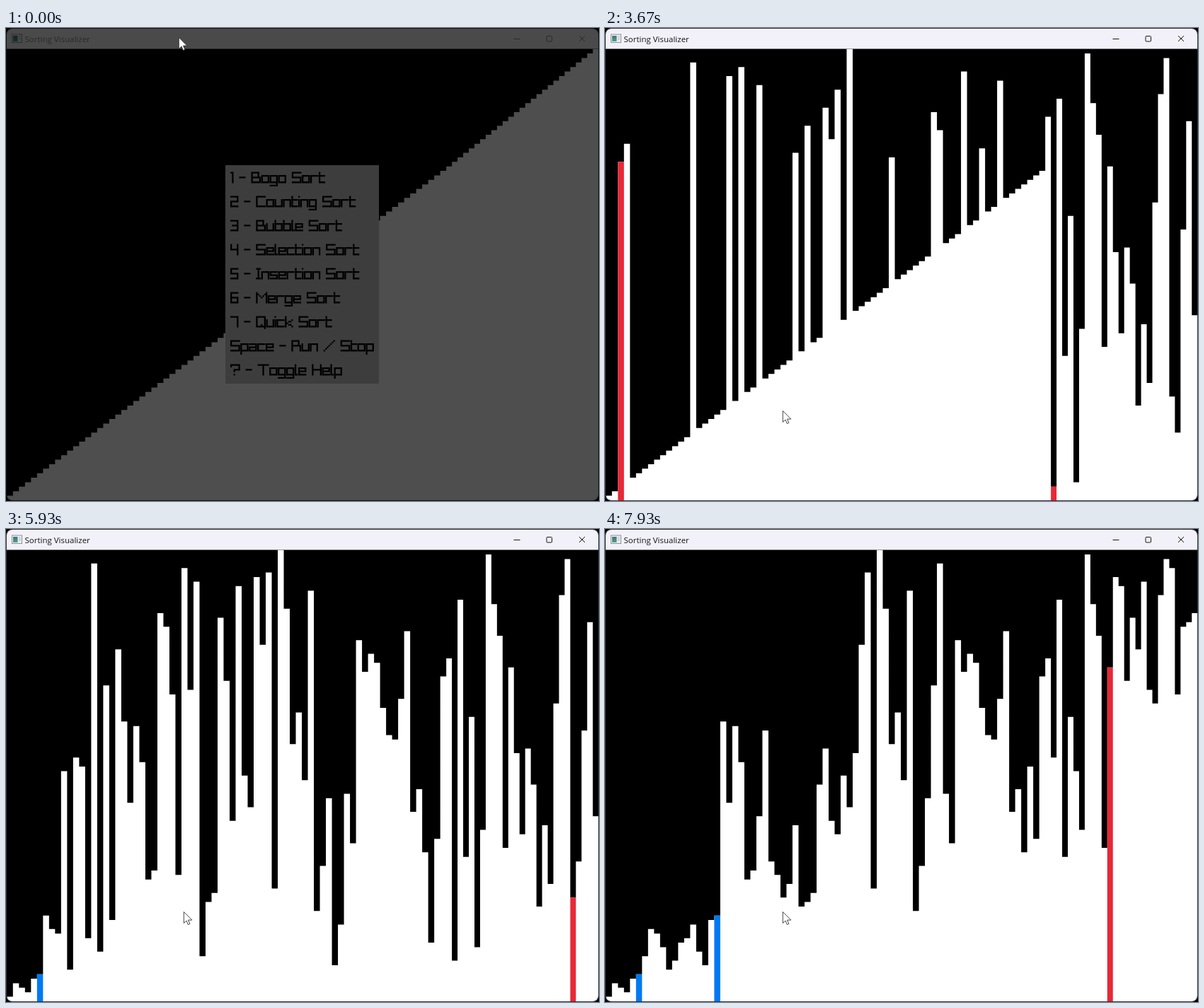
Write an HTML page with a canvas that moves like this. It is 838x669 px and loops after 8000 ms.

```html
<!DOCTYPE html>
<html lang="en">
<head>
<meta charset="utf-8">
<title>Sorting Visualizer</title>
<style>
  html, body { margin: 0; width: 100%; height: 100%; overflow: hidden; background: #060608; }
  #stage { position: absolute; left: 0; top: 0; width: 838px; height: 669px; overflow: hidden; }
  #edge { position: absolute; inset: 0; border-radius: 9px; background: #34343a; }
  #window { position: absolute; left: 1px; top: 1px; width: 836px; height: 667px; border-radius: 8px; overflow: hidden; background: #000; }
  #bars { position: absolute; left: -1px; top: -1px; }
  svg { position: absolute; left: 0; top: 0; }
  #dim { position: absolute; inset: 0; background: #000; }
  #caption { color: #161616; }
  #caption.inactive { color: #858585; }
</style>
</head>
<body>
<div id="stage">
  <div id="edge"></div>
  <div id="window"><canvas id="bars" width="838" height="669"></canvas></div>
  <svg width="838" height="669">
    <defs>
      <linearGradient id="pane" x2="0" y2="1">
        <stop offset="0" stop-color="#3f6f8f"/><stop offset="1" stop-color="#4fa37c"/>
      </linearGradient>
    </defs>
    <path id="bar" d="M1 29.5V9a8 8 0 0 1 8-8H829a8 8 0 0 1 8 8V29.5Z"/>
    <rect x="8.5" y="9" width="14" height="11.5" fill="#eef0f0" stroke="#8d9494"/>
    <rect x="10" y="11" width="6.5" height="8" fill="url(#pane)"/>
    <path d="M18 12h3M18 14h3M18 16h3" stroke="#b4bcbc"/>
    <g id="caption" fill="none" stroke="currentColor">
      <text x="26.5" y="19.6" font-size="11.5" font-family="'Open Sans','Noto Sans',sans-serif" fill="currentColor" stroke="none">Sorting Visualizer</text>
      <path d="M717.5 15.5h9M810 11l8 8M818 11l-8 8"/>
      <rect x="764" y="11.5" width="7.5" height="7.5" rx="1"/>
    </g>
    <g id="menu" role="img">
      <rect x="310" y="194" width="217" height="309" fill="#c8c8c8"/>
      <path id="lines"/>
    </g>
  </svg>
  <div id="dim"></div>
  <svg width="838" height="669">
    <path id="cursor" d="M0 0V16L3.7 12.5 6 18 8.5 17 6.2 11.6H11.5Z" fill="#fff" stroke="#333" stroke-width=".9"/>
  </svg>
</div>
<script>
const $ = id => document.getElementById(id);
const ctx = $('bars').getContext('2d');
const COUNT = 100, FPS = 15, LOOP = 8000;
const RED = '#e62937', BLUE = '#0079f1';

// Pixel font: each stroke is x1 y1 x2 y2, baseline on row 6
const GLYPHS = {
  1: '0010 1016', 2: '0040 4043 0343 0306 0646', 3: '0040 4046 1343 0646',
  4: '0003 0343 4046', 5: '0040 0003 0343 4346 0646', 6: '0040 0006 0343 4346 0646',
  7: '0040 4046', '?': '0050 0001 5053 2353 2324 2626', '-': '0333', '/': '0660',
  B: '0006 0040 4043 0353 5356 0656', C: '0050 0006 0656', H: '0006 5056 0353',
  I: '0020 1016 0626', M: '0006 6066 0033 6033', Q: '0050 0006 5056 0656 3557',
  R: '0006 0040 4043 0353 5356', S: '0050 0003 0353 5356 0656', T: '0060 3036',
  a: '0242 4246 0444 0406 0646', b: '0006 0242 4246 0646', c: '0242 0206 0646',
  e: '0242 0206 4244 0444 0646', g: '0242 0206 4248 0646 0848', i: '0000 0206',
  k: '0006 0442 1446', l: '0006 0616', n: '0242 0206 4246', o: '0242 0206 4246 0646',
  p: '0242 0208 4246 0646', r: '0242 0206', s: '0242 0204 0444 4446 0646',
  t: '0006 0232 0636', u: '0206 4246 0646'
};
const MENU = ['1 - Bogo Sort', '2 - Counting Sort', '3 - Bubble Sort', '4 - Selection Sort',
  '5 - Insertion Sort', '6 - Merge Sort', '7 - Quick Sort', 'Space - Run / Stop', '? - Toggle Help'];

function textPath(text, x, y, unit, gap) {
  let path = '';
  const box = (cx, cy, w, h) =>
    path += `M${x + cx * unit} ${y + cy * unit}h${w * unit}v${h * unit}h${-w * unit}z`;
  for (const ch of text) {
    let width = ch === ' ' ? 3 : 1;
    for (const stroke of GLYPHS[ch]?.split(' ') ?? []) {
      const [x1, y1, x2, y2] = [...stroke].map(Number);
      const dx = x2 - x1, dy = y2 - y1;
      width = Math.max(width, x1 + 1, x2 + 1);
      if (!dx || !dy) { box(x1, y1, dx + 1, dy + 1); continue; }
      const n = Math.max(Math.abs(dx), Math.abs(dy));
      for (let k = 0; k <= n; k++) box(x1 + Math.round(dx * k / n), y1 + Math.round(dy * k / n), 1, 1);
    }
    x += width * unit + gap;
  }
  return path;
}
$('lines').setAttribute('d', MENU.map((line, row) => textPath(line, 317, 203.4 + row * 34, 2.287, 0.5)).join(''));
$('menu').setAttribute('aria-label', MENU.join(', '));

// Order of the bars once the shuffle is done
const SHUFFLED = [
  6, 12, 9, 65, 5, 1, 19, 16, 31, 51, 7, 54, 52, 14, 97, 11, 70, 18, 78, 62,
  44, 61, 53, 27, 29, 86, 83, 68, 28, 96, 69, 93, 10, 22, 24, 85, 71, 40, 92, 50,
  43, 94, 79, 95, 25, 100, 87, 57, 64, 49, 91, 20, 30, 45, 8, 17, 46, 35, 80, 73,
  77, 75, 2, 59, 58, 67, 82, 42, 47, 33, 13, 36, 72, 76, 3, 89, 32, 63, 4, 38,
  99, 88, 81, 34, 74, 55, 37, 56, 48, 21, 39, 26, 66, 90, 98, 23, 15, 60, 84, 41];

const steps = [];

function record() {
  const values = Array.from({ length: COUNT }, (_, i) => i + 1);
  const placed = [];
  const log = (...active) => steps.push({ values: [...values], active, placed: [...placed] });
  const swap = (i, j) => { [values[i], values[j]] = [values[j], values[i]]; };

  log();
  for (let i = COUNT - 1; i > 0; i--) {
    const j = values.indexOf(SHUFFLED[i]);
    swap(i, j);
    log(i, j);
  }
  log();

  // Quick sort, three partitions, right side first
  for (let round = 0, lo = 0; round < 3; round++) {
    const pivot = values[lo];
    let i = lo, j = COUNT - 1;
    while (true) {
      while (log(j), values[j] > pivot) j--;
      while (i < j && (log(i), values[i] <= pivot)) i++;
      if (i >= j) break;
      swap(i, j);
      log(i, j);
    }
    swap(lo, j);
    placed.push(j);
    log();
    lo = j + 1;
  }
}
record();

// [video frame, sort step]
const PACE = [[50, 0], [51, 2], [62, 68], [68, 98], [69, 100], [70, 106], [89, 220], [102, 297], [115, 371], [119, 397]];

function stepAt(frame) {
  if (frame <= PACE[0][0]) return 0;
  const k = PACE.findIndex(([f]) => f >= frame);
  const [f0, s0] = PACE[k - 1], [f1, s1] = PACE[k];
  return Math.round(s0 + (s1 - s0) * (frame - f0) / (f1 - f0));
}

// The first 73 bars are slightly wider
const barX = i => 1.3 + 8.505 * Math.min(i, 73) + 7.965 * Math.max(i - 73, 0);

function fillBars(values, indices, color) {
  ctx.beginPath();
  for (const i of indices) {
    const x = barX(i), y = 668 - 6.383 * values[i];
    ctx.rect(x, y, barX(i + 1) - x, 669 - y);
  }
  ctx.fillStyle = color;
  ctx.fill();
}

function drawBars({ values, active, placed }) {
  ctx.fillStyle = '#000';
  ctx.fillRect(0, 0, 838, 669);
  fillBars(values, values.keys(), '#fff');
  fillBars(values, placed, BLUE);
  fillBars(values, active, RED);
}

let last = -1;
function render() {
  const time = performance.now() % LOOP;
  const frame = Math.min(119, Math.floor((time + 4) * FPS / 1000));
  if (frame !== last) {
    last = frame;
    drawBars(steps[stepAt(frame)]);
    const help = frame < 46;
    $('menu').style.display = help ? '' : 'none';
    $('bar').setAttribute('fill', help ? '#f3f3f3' : '#f2f1f9');
    $('caption').setAttribute('class', frame < 4 ? 'inactive' : '');
    $('dim').style.opacity = Math.max(0, 0.695 * (1 - frame / 4));
    const p = Math.min(1, frame / 12), ease = p * p * (3 - 2 * p);
    $('cursor').setAttribute('transform', `translate(${244.3 + 7 * ease} ${13.5 + 528 * ease})`);
  }
  requestAnimationFrame(render);
}
render();
</script>
</body>
</html>
```
